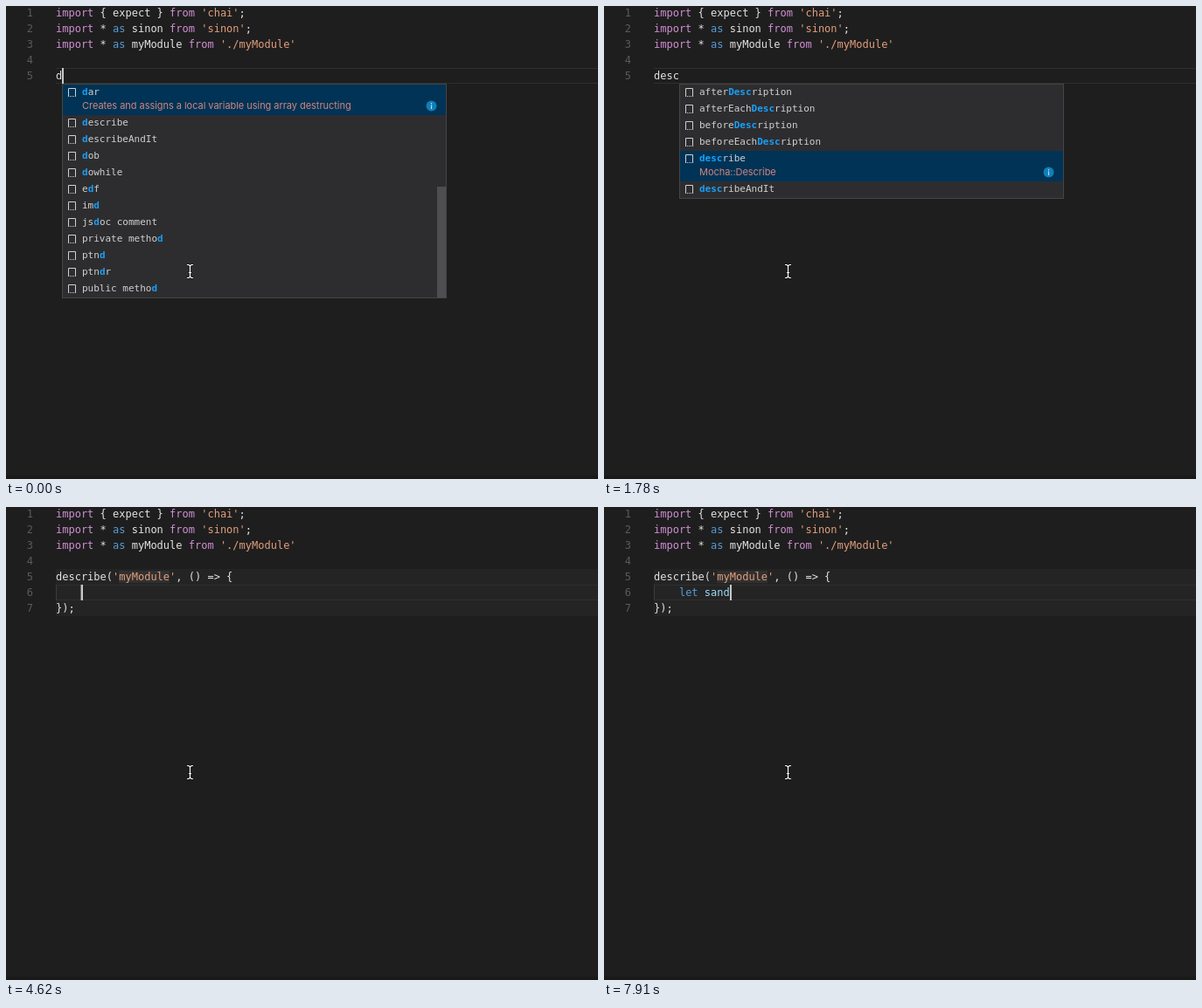
An HTML page that plays this animation: 677 by 542 pixels, repeating every 8000 ms.

```html
<!DOCTYPE html>
<html lang="en">
<head>
<meta charset="utf-8">
<title>Editor typing</title>
<style>
  html, body { margin: 0; width: 100%; height: 100%; overflow: hidden; background: #1e1e1e; }
  #stage { position: relative; width: 677px; height: 542px; overflow: hidden; background: #1e1e1e; }
  #stage div, #stage svg { position: absolute; }
  .line, .num { font: 12px/18px "DejaVu Sans Mono", monospace; white-space: pre; height: 18px; color: #e4e4e4; }
  .line { left: 57px; }
  .num { left: 0; width: 31px; text-align: right; color: #5a5a5a; }
  .kw { color: #d18fd4; }
  .st { color: #e39e7c; }
  .op { color: #569cd6; }
  .va { color: #9cdcfe; }
  .ph { background: #303030; }
  #region { left: 57px; top: 71px; width: 620px; height: 54px; background: #242424; }
  #current { left: 57px; width: 620px; height: 18px; box-sizing: border-box; border: solid #2f2f2f; border-width: 1px 0; }
  #indent { left: 57px; top: 89px; width: 1px; height: 18px; background: #3c3c3c; }
  #stop { left: 85px; top: 89px; width: 2px; height: 18px; background: #6a6a6a; }
  #caret { width: 2px; height: 18px; background: #c8c8c4; }
  #popup { width: 438px; border: 1px solid #454545; background: #2d2d30; overflow: hidden; }
  .row { left: 0; width: 438px; height: 19px; font: 11px/17px "DejaVu Sans Mono", monospace; white-space: pre; color: #d0d0d0; }
  .row.on { height: 35px; background: #003355; }
  .row b { color: #18a0f8; }
  .label { left: 22px; top: 0; }
  .detail { left: 22px; top: 16px; font: 11px/16px Inter, sans-serif; letter-spacing: -.04px; color: #d0857f; }
  #thumb { left: 428px; width: 10px; }
  #foot { left: 0; top: 538px; width: 677px; height: 4px; background: #1a191a; }
</style>
</head>
<body>
<div id="stage">
  <div id="region"></div>
  <div id="current"></div>
  <div id="indent"></div>
  <div id="text"></div>
  <div id="stop"></div>
  <div id="caret"></div>
  <div id="popup"></div>
  <div id="foot"></div>
  <svg style="left:205px;top:295px" width="11" height="18" fill="none">
    <path d="M2 1.5h2l1.5 1.5l1.5 -1.5h2M5.5 3v12M2 16.5h2l1.5 -1.5l1.5 1.5h2M4 10.5h3" stroke="#000" stroke-width="2.4" opacity=".5"/>
    <path d="M2 1.5h2l1.5 1.5l1.5 -1.5h2M5.5 3v12M2 16.5h2l1.5 -1.5l1.5 1.5h2M4 10.5h3" stroke="#fff" stroke-width="1.2"/>
  </svg>
</div>
<script>
const LOOP = 8000, CHAR = 7.2246;
const $ = id => document.getElementById(id);
const tag = (cls, s) => `<span class="${cls}">${s}</span>`;
const top_ = n => n * 18 - 19;
const colX = c => Math.round(57 + c * CHAR);

const head = [
  `${tag('kw', 'import')} { expect } ${tag('kw', 'from')} ${tag('st', "'chai'")};`,
  `${tag('kw', 'import')} * ${tag('op', 'as')} sinon ${tag('kw', 'from')} ${tag('st', "'sinon'")};`,
  `${tag('kw', 'import')} * ${tag('op', 'as')} myModule ${tag('kw', 'from')} ${tag('st', "'./myModule'")}`,
  ''
];

// Completion lists: a caret pair [..] marks the matched letters, * the chosen row.
const letterD = {
  rows: ['*[d]ar', '[d]escribe', '[d]escribeAndIt', '[d]ob', '[d]owhile', 'e[d]f', 'im[d]',
    'js[d]oc comment', 'private metho[d]', 'ptn[d]', 'ptn[d]r', 'public metho[d]'],
  detail: 'Creates and assigns a local variable using array destructing',
  thumb: [117, 127, '#4e4e50']
};
const matching = (s, thumb) => ({
  rows: ['afterDescription', 'afterEachDescription', 'beforeDescription', 'beforeEachDescription',
    '*describe', 'describeAndIt'].map(r => r.replace(new RegExp(s, 'i'), '[$&]')),
  detail: 'Mocha::Describe',
  thumb
});
const logList = { rows: ['*[l]og'], detail: 'Log to the console' };

const call = name => `describe(${tag('st', "'" + tag('ph', name) + "'")}, () =&gt; {`;
const full = call('myModule');
const letSand = s => '    ' + tag('op', 'let') + (s ? ' ' + tag('va', s.trim()) : '');

// Each state: start, line 5, line 6 (null before expansion), caret line, caret column, list, list x
const states = [
  [0, 'd', null, 5, 1, letterD, 64],
  [740, 'de', null, 5, 2, matching('de', [0, 130, '#3c3c3e']), 71],
  [1030, 'des', null, 5, 3, matching('des'), 79],
  [1180, 'desc', null, 5, 4, matching('desc'), 81],
  [1330, 'desc', null, 5, 4, matching('desc'), 86],
  [1930, call(''), '', 5, 10],
  [3120, full, '', 5, 18],
  [3570, full, '', 6, 4],
  [6860, full, '    l', 6, 5, logList, 93],
  [7010, full, letSand(''), 6, 7],
  [7160, full, letSand(' '), 6, 8],
  [7610, full, letSand('sa'), 6, 10],
  [7760, full, letSand('san'), 6, 11],
  [7910, full, letSand('sand'), 6, 12]
];
const caretOff = [[440, 740], [1780, 1930], [2370, 2820], [4170, 4620], [5070, 5510], [6110, 6560]];

const icon = `<svg style="left:6px;top:4px" width="10" height="11" fill="none" stroke="#d0d0d0">
  <path d="M.5 9V.5h8V9"/><path d="M0 9.5h9" stroke-dasharray="1 1"/></svg>`;
const info = `<svg style="left:415px;top:18px" width="13" height="13">
  <circle cx="6.5" cy="6.5" r="6" fill="#0f7fb8"/>
  <path d="M6.5 3v1.4M6.5 5.5v4.5" stroke="#b8dcf0" stroke-width="1.2"/></svg>`;

function listHtml(list) {
  let y = 0, html = '';
  for (const r of list.rows) {
    const on = r[0] === '*';
    const label = r.replace('*', '').replace('[', '<b>').replace(']', '</b>');
    html += `<div class="row${on ? ' on' : ''}" style="top:${y}px">${icon}<div class="label">${label}</div>` +
      (on ? `<div class="detail">${list.detail}</div>${info}` : '') + '</div>';
    y += on ? 35 : 19;
  }
  if (list.thumb) {
    const [top, height, color] = list.thumb;
    html += `<div id="thumb" style="top:${top}px;height:${height}px;background:${color}"></div>`;
  }
  $('popup').style.height = y + 'px';
  return html;
}

const show = (id, on) => { $(id).style.display = on ? 'block' : 'none'; };

function render([, five, six, line, col, list, x]) {
  const open = six !== null;
  const lines = [...head, five, ...(open ? [six, '});'] : [])];
  $('text').innerHTML = lines.map((s, i) =>
    `<div class="num" style="top:${top_(i + 1)}px">${i + 1}</div>` +
    `<div class="line" style="top:${top_(i + 1)}px">${s}</div>`).join('');
  $('current').style.top = $('caret').style.top = top_(line) + 'px';
  $('caret').style.left = colX(col) + 'px';
  show('region', open);
  show('indent', open);
  show('stop', six === '');
  show('popup', list);
  if (list) {
    $('popup').innerHTML = listHtml(list);
    $('popup').style.left = x + 'px';
    $('popup').style.top = top_(line + 1) + 'px';
  }
}

let last;
function tick() {
  const t = performance.now() % LOOP;
  const state = states.filter(s => s[0] <= t).pop();
  if (state !== last) render(last = state);
  show('caret', !caretOff.some(([a, b]) => t >= a && t < b));
  requestAnimationFrame(tick);
}
tick();
</script>
</body>
</html>
```
